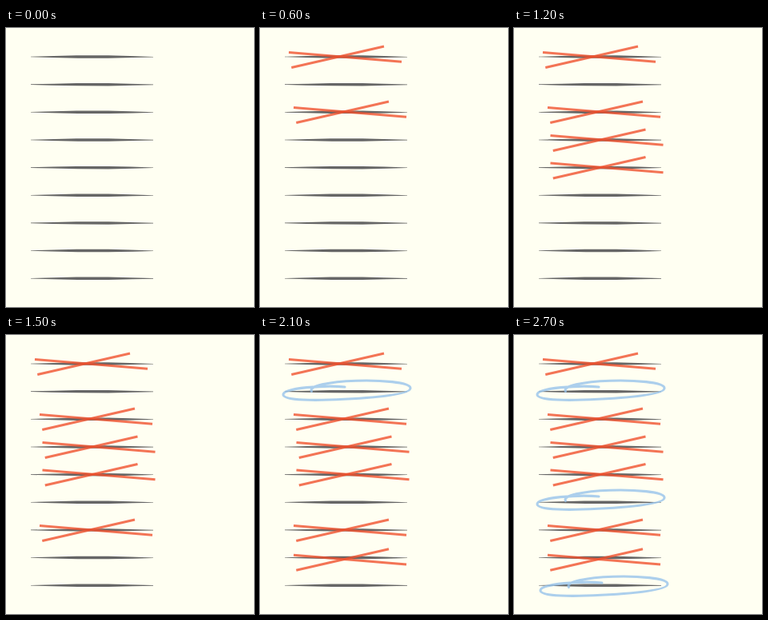
Write an HTML page that moves like this. It is 310 by 349 pixels and loops after 3000 ms.

```html
<!DOCTYPE html>
<html lang="en">
<head>
<meta charset="utf-8">
<title>Crossing out a list</title>
<style>
  html, body { margin: 0; width: 100%; height: 100%; overflow: hidden; background: #fffff2; }
  svg { display: block; width: 310px; height: 349px; }
  .rule { fill: #666; }
  .mark { fill: none; stroke-width: 3; stroke-opacity: .8; }
  .cross { stroke: #f0522f; }
  .ring { stroke: #98c4ec; stroke-width: 3.1; stroke-linecap: round; }
</style>
</head>
<body>
<svg id="stage" viewBox="0 0 310 349"></svg>
<script>
const LOOP = 3000, STEP = 300;
const stage = document.getElementById('stage');

const RULE = 'M31 -.4L60 -1.1L88 -1.8H128L155 -1.1L184 -.2V.4L158 1L128 1.7L90 1.6L58 .9L31 .2Z';
const CROSS = ['M36 30.5L177 42.3', 'M39.3 49.5L155 23'];
const RING = ['M106 65C82 62.5 29 66 29 74.5C29 82.5 72 82 105 80.3' +
  'C150 78 188 74 188 66.5C188 59 150 56.2 120 57.2C86 58.3 60 64 64.5 70.5'];

// kind, dx, dy in order of appearance, one per step
const marks = [
  ['cross', 0, 0],
  ['cross', 6, 69],
  ['cross', 9.5, 104],
  ['cross', 9.5, 138.5],
  ['cross', 6, 208],
  ['cross', 6, 244.7],
  ['ring', 0, 0],
  ['ring', 0, 137],
  ['ring', 4, 245]
];

function add(parent, tag, attrs) {
  const el = document.createElementNS('http://www.w3.org/2000/svg', tag);
  for (const key in attrs) el.setAttribute(key, attrs[key]);
  return parent.appendChild(el);
}

for (let i = 0; i < 9; i++) {
  add(stage, 'path', { class: 'rule', d: RULE, transform: `translate(0 ${36.1 + i * 34.65})` });
}

const groups = marks.map(([kind, dx, dy]) => {
  const g = add(stage, 'g', { transform: `translate(${dx} ${dy})`, visibility: 'hidden' });
  for (const d of kind === 'cross' ? CROSS : RING) add(g, 'path', { class: `mark ${kind}`, d });
  return g;
});

const start = performance.now();
function draw(now) {
  const shown = Math.floor(Math.max(0, now - start) % LOOP / STEP);
  groups.forEach((g, i) => g.setAttribute('visibility', i < shown ? 'visible' : 'hidden'));
  requestAnimationFrame(draw);
}
draw(start);
</script>
</body>
</html>
```
